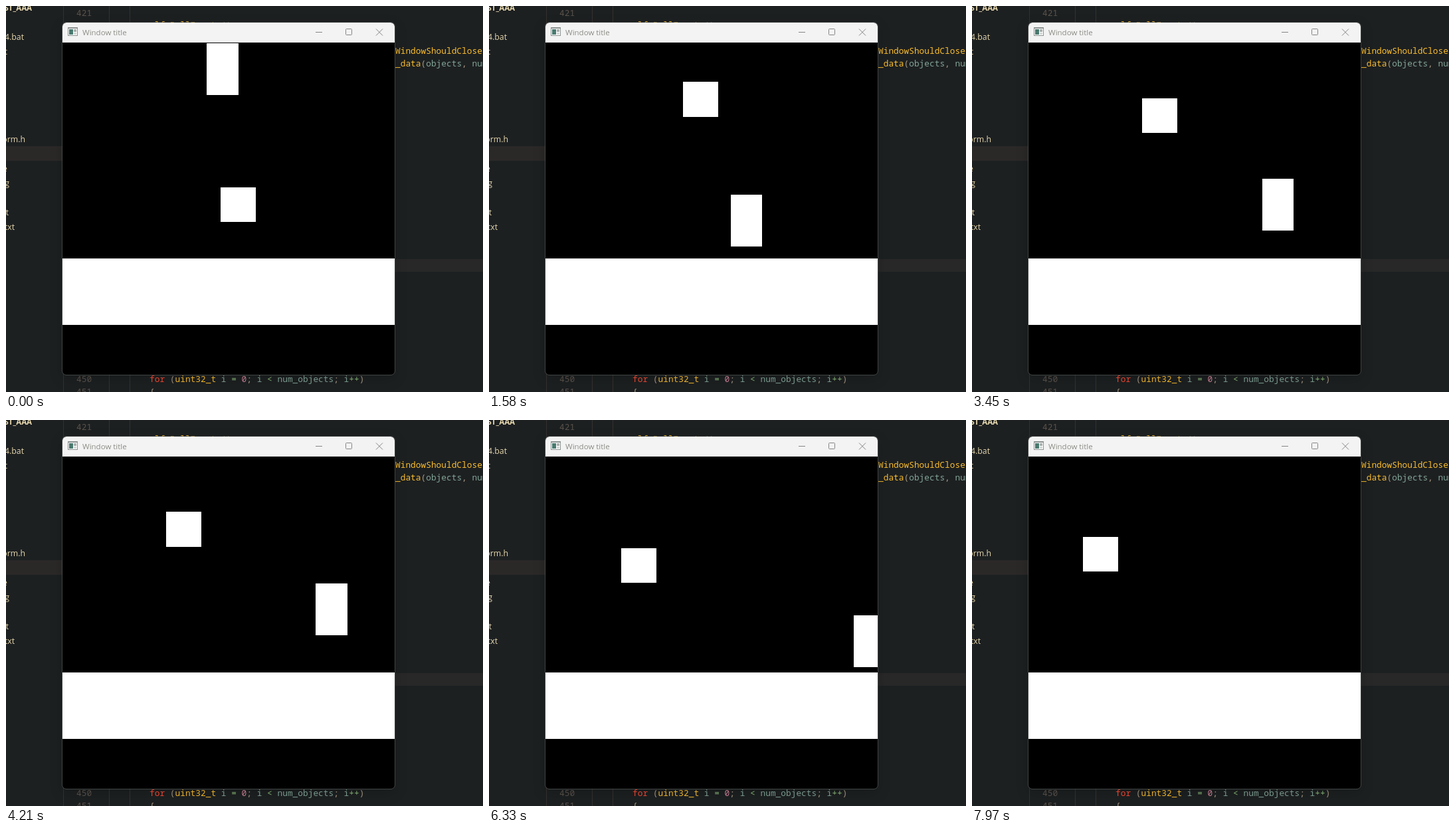
An HTML page with a canvas for the animation above (8.03 s loop, 718 px wide and 581 px high).

```html
<!DOCTYPE html>
<html lang="en">
<head>
<meta charset="utf-8">
<title>Window title</title>
<style>
html, body { margin: 0; width: 100%; height: 100%; overflow: hidden; background: #1d2021; }
canvas { display: block; }
</style>
</head>
<body>
<canvas id="stage" width="718" height="581"></canvas>
<script>
const ctx = document.getElementById('stage').getContext('2d');
const LOOP = 8030;
const HALF_G = 1186;           // half of gravity, px/s²
const FLOOR = 380;
const CODE = '12.83px "Noto Sans Mono", monospace';
const SIDE = '12.3px "Open Sans", sans-serif';
const YELLOW = '#fabd2f', BLUE = '#83a598', GREY = '#a89984', GREEN = '#8ec07c', DIM = '#5a524c', CREAM = '#e6d7ae';

// Hits are [seconds, height] where the two bodies or the floor meet early on.
// From the last hit, a floor landing, each flight lasts keep times the one before.
const box = {
  x: 323.1, vx: -19.58, w: 53.2, h: 52.5, flight: .862, keep: .977,
  hits: [[0, 55], [.305, 104.3], [.431, 0], [.466, 31.7], [.501, 0], [.645, 109], [1.026, 0], [1.155, 73], [1.231, 0]]
};
const pillar = {
  x: 302.2, vx: 39, w: 47.5, h: 78, flight: .655, keep: .969,
  hits: [[0, 246], [.305, 156.4], [.466, 83.7], [.645, 161], [1.155, 125], [1.607, 0]]
};

// Ballistic arc between two known points.
function arc(t, [t0, h0], [t1, h1]) {
  return h0 + (h1 - h0) * (t - t0) / (t1 - t0) + HALF_G * (t - t0) * (t1 - t);
}

function heightAt(body, t) {
  const next = body.hits.findIndex(hit => hit[0] > t);
  if (next > 0) return arc(t, body.hits[next - 1], body.hits[next]);
  let start = body.hits.at(-1)[0], flight = body.flight;
  while (start + flight < t) {
    start += flight;
    flight *= body.keep;
  }
  return arc(t, [start, 0], [start + flight, 0]);
}

function rect(x, y, w, h, color) {
  ctx.fillStyle = color;
  ctx.fillRect(x, y, w, h);
}

function text(str, x, y, color, font, align = 'left') {
  ctx.font = font;
  ctx.textAlign = align;
  ctx.fillStyle = color;
  ctx.fillText(str, x, y);
}

function code(x, y, ...parts) {
  for (const [str, color] of parts) {
    text(str, x, y, color, CODE);
    x += str.length * 7.7;
  }
}

function line(color, x1, y1, x2, y2) {
  ctx.strokeStyle = color;
  ctx.lineWidth = 1;
  ctx.beginPath();
  ctx.moveTo(x1, y1);
  ctx.lineTo(x2, y2);
  ctx.stroke();
}

function roundBox(x, y, w, h, r) {
  ctx.beginPath();
  ctx.roundRect(x, y, w, h, r);
}

function file(row, name, right) {
  text(name, right, 51 + row * 22, CREAM, SIDE, 'right');
}

function drawEditor() {
  rect(0, 0, 718, 581, '#1d2021');
  rect(0, 211, 85, 22, '#2b2928');
  rect(585, 381, 133, 19, '#282828');
  for (const x of [86.5, 155.5, 186.5]) line('#34312f', x, 0, x, 581);

  text('ST_AAA', 39, 7, CREAM, 'bold 11.5px "Open Sans", sans-serif', 'right');
  file(0, '4.bat', 27);
  file(1, 't', 2);
  file(7, 'orm.h', 29);
  file(9, 'e', 2);
  file(10, 'g', 5);
  file(12, 't', 4);
  file(13, '.txt', 13);

  code(106, 15, ['421', DIM]);
  code(216, 33, ['glfwPollEvents', YELLOW], ['();', GREY]);
  code(586, 72, ['WindowShouldClose', YELLOW]);
  code(586, 91, ['_data', YELLOW], ['(', GREY], ['objects', BLUE], [', ', GREY], ['num', BLUE]);
  code(106, 566, ['450', DIM]);
  code(216, 566, ['for ', '#fb4934'], ['(', GREY], ['uint32_t ', YELLOW], ['i ', BLUE], ['= ', GREEN],
    ['0', '#d3869b'], ['; ', GREY], ['i ', BLUE], ['< ', GREEN], ['num_objects', BLUE], ['; ', GREY],
    ['i', BLUE], ['++', GREEN], [')', GREY]);
  code(106, 585, ['451', DIM]);
  code(216, 585, ['{', GREY]);
}

function drawTitleBar() {
  const ink = '#858585';
  rect(85, 25, 500, 30, '#f3f3f3');
  rect(93, 32, 15, 13, '#8b9290');
  rect(94, 34, 13, 10, '#ffffff');
  rect(95, 35, 6, 8, '#4a7a70');
  rect(102, 35, 4, 4, '#a9b0ae');
  rect(102, 40, 4, 3, '#d4d8d6');
  text('Window title', 115, 44, '#8c8c86', '11.5px "Open Sans", sans-serif');
  line(ink, 466, 39.5, 476, 39.5);
  line(ink, 557, 34.5, 567, 44.5);
  line(ink, 567, 34.5, 557, 44.5);
  roundBox(511.5, 34.5, 9, 9, 1);
  ctx.stroke();
}

function drawBody(body, t) {
  const x = body.x + body.vx * t;
  const base = FLOOR - heightAt(body, t);
  const left = Math.round(x), top = Math.round(base - body.h);
  rect(left, top, Math.round(x + body.w) - left, Math.round(base) - top, '#ffffff');
}

function drawWindow(t) {
  ctx.save();
  ctx.shadowColor = 'rgba(0,0,0,.18)';
  ctx.shadowBlur = 20;
  ctx.shadowOffsetY = 6;
  roundBox(85, 25, 500, 530, 6);
  ctx.fillStyle = '#000000';
  ctx.fill();
  ctx.restore();

  ctx.save();
  roundBox(85, 25, 500, 530, 6);
  ctx.clip();
  rect(85, 55, 500, 500, '#000000');
  rect(85, FLOOR, 500, 100, '#ffffff');
  drawBody(box, t);
  drawBody(pillar, t);
  drawTitleBar();
  ctx.restore();

  ctx.strokeStyle = 'rgba(90,95,92,.6)';
  ctx.lineWidth = 1;
  roundBox(84.5, 24.5, 501, 531, 6.5);
  ctx.stroke();
}

// Motion advances in steps of about 69 ms, slightly shorter late in the loop.
function stepTime(ms) {
  const start = ms < 4130 ? 0 : 4140;
  const step = start ? 68.4 : 69;
  const n = Math.floor((ms + 12 - start) / step);
  return Math.max(0, start + n * step - 3) / 1000;
}

const begin = performance.now();
function frame() {
  drawEditor();
  drawWindow(stepTime((performance.now() - begin) % LOOP));
  requestAnimationFrame(frame);
}
frame();
</script>
</body>
</html>
```
